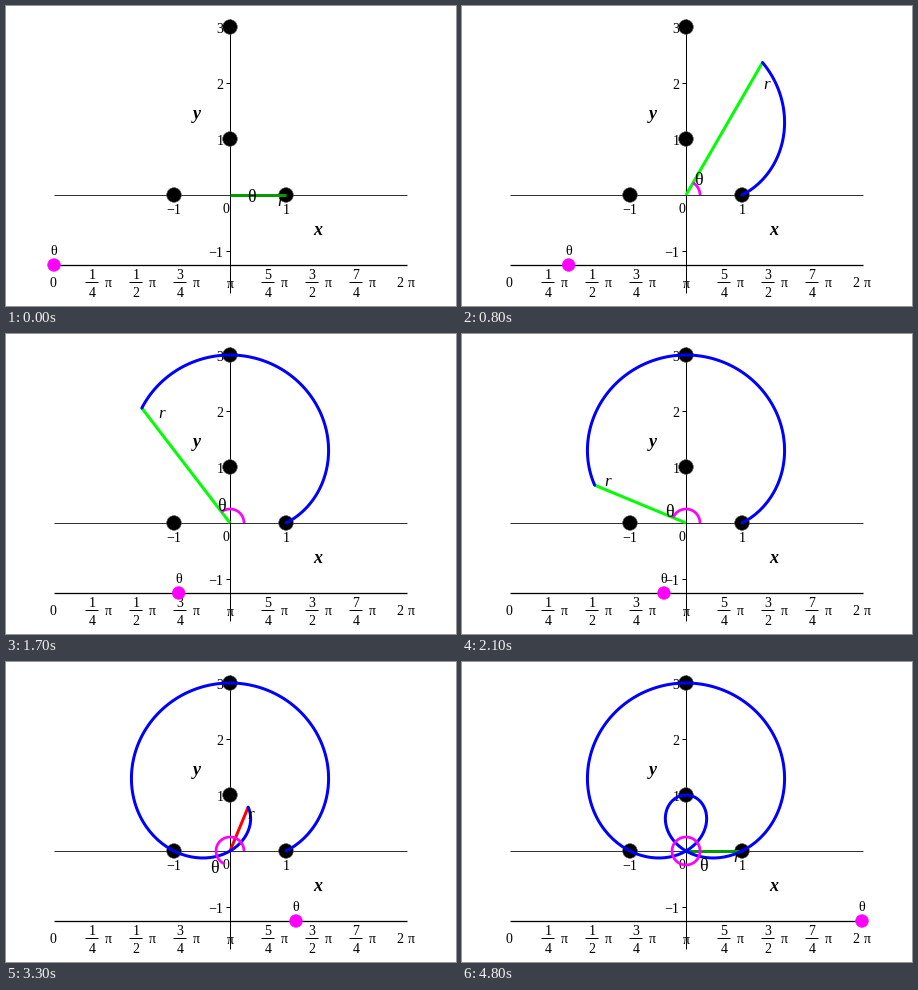
Write a matplotlib script that moves like this. It is 450 px wide and 300 px high and loops after 4.9 s.

```python
import numpy as np
import matplotlib.pyplot as plt
from matplotlib.animation import FuncAnimation
from matplotlib.patches import Circle

W, H, DPI = 450, 300, 100
FRAMES, INTERVAL = 49, 100
OX, OY, UNIT = 224, 189, 56
SLIDER_Y, SLIDER_X0, EIGHTH = 259, 48, 44
BLUE, MAGENTA = "#0000ff", "#ff00ff"
PX = 72 / DPI

fig = plt.figure(figsize=(W / DPI, H / DPI), dpi=DPI, facecolor="white")
ax = fig.add_axes([0, 0, 1, 1])
ax.set_xlim(0, W)
ax.set_ylim(H, 0)
ax.axis("off")


def polar(r, angle):
    """Stage position of a polar point given in graph units."""
    return OX + UNIT * r * np.cos(angle), OY - UNIT * r * np.sin(angle)


def radius(angle):
    return 1 + 2 * np.sin(angle)


def line(xs, ys, color="black", width=1, z=1, cap="butt"):
    return ax.plot(xs, ys, color=color, lw=width * PX, zorder=z,
                   solid_capstyle=cap)[0]


def label(x, base, s, size=14, z=3, **style):
    return ax.text(x, base, s, fontsize=size * PX, family="Liberation Serif",
                   ha="center", va="baseline", zorder=z, **style)


def dot(x, y, r, color, edge, z):
    return ax.add_patch(Circle((x, y), r, fc=color, ec=edge, lw=0.6 * PX,
                               zorder=z))


# Axes, ticks and numbers
line([48, 401], [OY, OY], "#333333")
line([OX, OX], [13, 287])
for n in (-1, 1, 2, 3):
    y = OY - UNIT * n
    line([OX - 4, OX], [y, y])
    text = str(n).replace("-", "\u2212")
    label(210 if n < 0 else 214, y + 6, text)
for n in (-1, 1):
    x = OX + UNIT * n
    line([x, x], [OY, OY + 4])
    label(x, 208, str(n).replace("-", "\u2212"))
label(220, 207, "0")
label(191, 113, "y", 18, weight="bold", style="italic")
label(312, 229, "x", 18, weight="bold", style="italic")

for x, y in ((0, 1), (0, 3), (-1, 0), (1, 0)):
    dot(OX + UNIT * x, OY - UNIT * y, 7.3, "black", "#555555", 2)

# Angle slider
line([SLIDER_X0, 401], [SLIDER_Y, SLIDER_Y], width=1.3)
label(47, 281, "0")
label(OX, 282, "π")
label(394, 281, "2")
label(405, 281, "π")
fractions = {1: "14", 2: "12", 3: "34", 5: "54", 6: "32", 7: "74"}
for k, (top, bottom) in fractions.items():
    x = SLIDER_X0 + EIGHTH * k
    label(x - 6, 273, top)
    label(x - 6, 291, bottom)
    line([x - 13, x], [276, 276])
    label(x + 10, 281, "π")

# Moving parts
ray = line([], [], "#00ff00", 3, 4)
curve = line([], [], BLUE, 3, 5, "round")
arc = line([], [], MAGENTA, 2.7, 6)
r_label = label(0, 0, "r", 17, 7, style="italic")
theta_label = label(0, 0, "θ", 18, 7)
knob = dot(SLIDER_X0, SLIDER_Y, 6.3, MAGENTA, MAGENTA, 6)
knob_label = label(0, 249, "θ", 14, 7)


def ray_color(r, angle):
    if r < 0:
        return "#ff0000"
    on_axis = abs(np.sin(angle)) < 1e-9
    return "#009c00" if on_axis else "#00ff00"


def update(i):
    theta = 2 * np.pi * i / (FRAMES - 1)
    r = radius(theta)
    sweep = np.linspace(0, theta, 4 + 6 * i)

    x, y = polar(r, theta)
    ray.set_data([OX, x], [OY, y])
    ray.set_color(ray_color(r, theta))
    curve.set_data(*polar(radius(sweep), sweep))
    curve.set_visible(i > 0)
    arc.set_data(*polar(0.25, sweep))
    arc.set_visible(i > 0)

    x, y = polar(0.9 * r, theta - 0.1)
    r_label.set_position((x, y + 5.5))
    x, y = polar(0.385, 0.9 * theta)
    theta_label.set_position((x, y + 7.5))

    x = SLIDER_X0 + 8 * EIGHTH * i / (FRAMES - 1)
    knob.center = x, SLIDER_Y
    knob_label.set_x(x)
    return ray, curve, arc, r_label, theta_label, knob, knob_label


anim = FuncAnimation(fig, update, frames=FRAMES, interval=INTERVAL,
                     init_func=lambda: update(0), repeat=True, repeat_delay=0)
plt.show()
```
